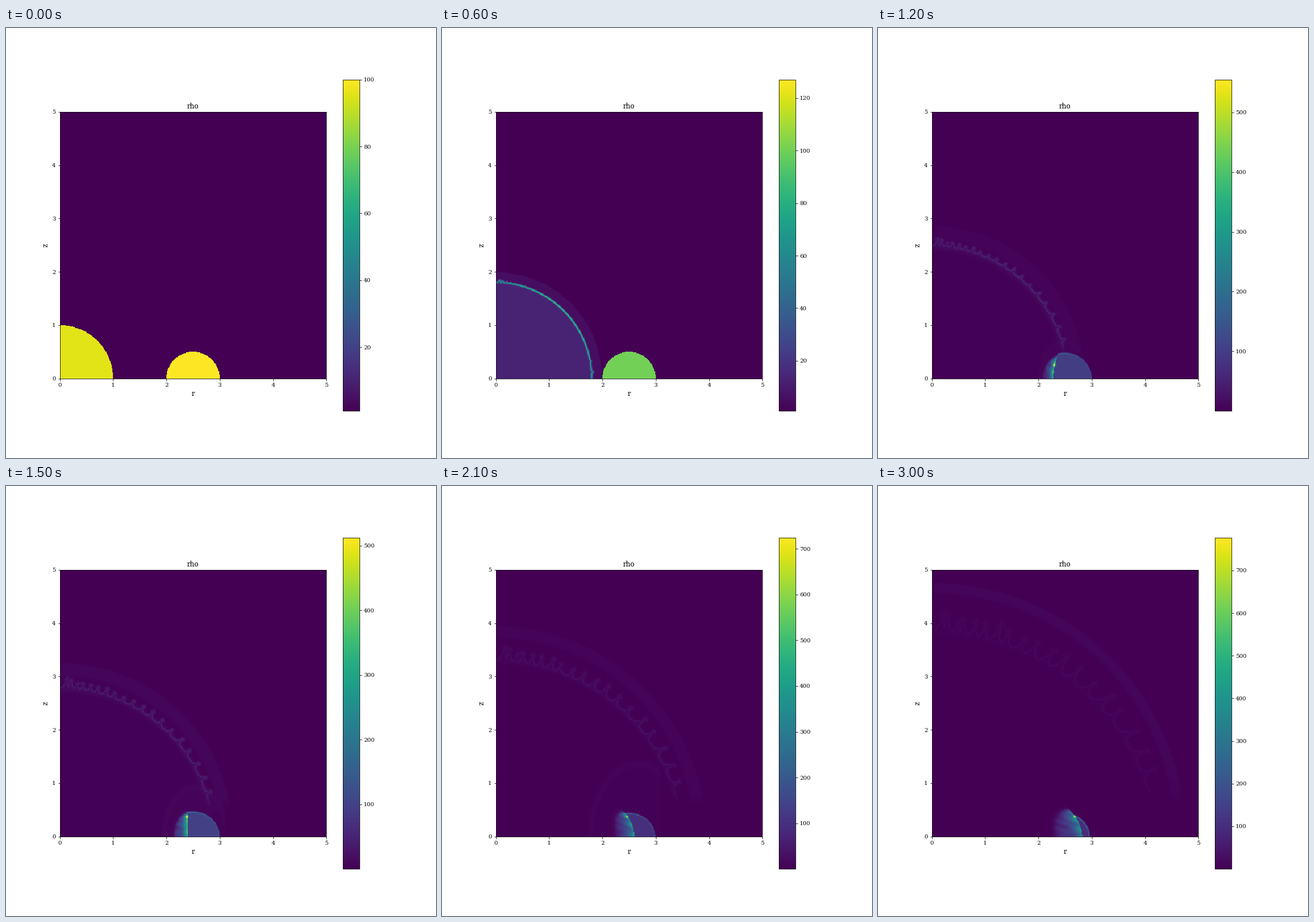
Animation of 748x748 px, one loop 3.3 s. Source, as a matplotlib script:

```python
import numpy as np
import matplotlib.pyplot as plt
from matplotlib.animation import FuncAnimation

FRAMES, INTERVAL = 11, 300
SIZE, DPI, N = 748, 72, 400
HIT = 3                       # step at which the blast reaches the cloud
PEAKS = [100, 109, 127, 669, 555, 512.5, 604.5, 724.7, 760, 802, 777]

plt.rcParams["font.family"] = "DejaVu Serif"
plt.rcParams["font.size"] = 10

# Instability fingers: closely spaced near the z axis, wider further out
rng = np.random.default_rng(4)
index = np.arange(21)
ANGLES = np.radians(2.2 + 1.9 * index + .115 * index ** 2)
LEAN = rng.uniform(-.05, .05, len(ANGLES))
SCALE = rng.uniform(.75, 1.15, len(ANGLES))

edges = np.linspace(0, 5, N + 1)
cell = (edges[1:] + edges[:-1]) / 2
r, z = np.meshgrid(cell, cell)
R = np.hypot(r, z)
theta = np.arctan2(r, z)


def gauss(x, width):
    return np.exp(-(x / width) ** 2)


def soft(x, width):
    """Smooth step from 0 to 1."""
    return 1 / (1 + np.exp(-np.clip(x / width, -50, 50)))


def near_axis(angle):
    return np.exp(-np.minimum(angle, np.pi / 2 - angle) / .16)


def fingers(k, base):
    """Shell outline pulled up into fingers, and their mushroom caps."""
    grown = .042 * max(k - 2, 0)
    at_axis = .03 * min(k, 2.5)
    height = grown + at_axis * near_axis(theta)
    line, caps = base.copy(), np.zeros_like(R)
    for angle, lean, scale in zip(ANGLES, LEAN, SCALE):
        rise = (grown + at_axis * near_axis(angle)) * scale
        across = (theta - angle - lean * (R - base)) * R
        line = np.maximum(line, base + height * scale
                          * np.exp(-np.abs(across) / (.01 + .1 * rise)))
        cap = .02 + .12 * rise
        along = R - base - rise + cap
        ring = gauss(np.hypot(across, along) - cap, .014)
        caps = np.maximum(caps, ring * (along > -.2 * cap)
                          * min(1, rise / .12))
    return line, caps


def blast(k):
    """Ejecta, shell with fingers, and the swept-up gas ahead of it."""
    radius = 1 + .43 * k - .015 * k ** 2
    shock = 1 + .525 * k - .015 * k ** 2
    base = radius * (1 + .014 * max(k - 2, 0) * (1 - np.cos(theta)))
    rho = np.where(R < base, max(95.5 / radius ** 3.4, 1), 1)
    if k == 0:
        return rho

    shadow = np.radians(76 + .25 * k if k >= HIT else 99)
    band = min(.11 * k, .27 - .008 * k)
    ahead = (R >= base) & (R < shock)
    swept = 1 + (2 + .6 * k) * soft(R - shock + band, .012)
    rho = rho + ahead * swept * soft(shadow + .04 - theta, .02)

    line, caps = fingers(k, base)
    slope_z, slope_r = np.gradient(line, cell, cell)
    slope = (slope_r * z - slope_z * r) / R
    dist = (R - line) / np.sqrt(1 + slope ** 2)
    edge = gauss(dist, .012 + .002 * min(k, 4))
    glow = .3 * gauss(R - base, .05) * np.clip(k - 2, 0, 2) / 2
    shape = np.maximum(np.maximum(edge, .75 * caps), glow)
    shape *= .72 + .28 * np.sin(2 * theta)
    return rho + 125 * np.exp(-.22 * k) * shape * soft(shadow - theta, .015)


def bow(k):
    """Faint wave reflected back from the cloud."""
    grow = .15 * (k - 1)
    level = 8 * max(np.sin(np.pi * (k - HIT) / 6.5), 0)
    q = np.hypot((r - 2.3 - .4 * grow) / grow, z / (1.55 * grow))
    return level * ((q < 1) * .5 + .6 * gauss(q - 1, .06)) * (r < 3.1)


def stripped(k, s, behind):
    """Compressed gas at the shock inside the cloud and its trailing plume."""
    reach, top = .08 + .47 * s, .35 + .14 * s ** .6
    fill = 1 - (behind / reach) ** 2 - (z / top) ** 2
    swirl = .8 + .2 * np.sin(16 * behind + 5 * np.sin(9 * z + 1) + k)
    ripple = .85 + .15 * np.sin(34 * z + k)
    body = 320 * ripple * np.exp(-behind / (.01 + .14 * s))
    body += 130 * swirl * np.exp(-behind / (1.5 * reach))
    curl = 90 * gauss(fill - .1, .12) * np.exp(-behind / .12) * (z > .2)
    return (behind >= 0) * (soft(fill - .1, .1) * body + curl)


def cloud(rho, k):
    s = max(k - 2, 0) / 8     # how far the shock has crossed the cloud
    bend = np.clip(2.5 - .5 * k, -.93, 1)

    def front(height):
        return 2 + 1.2 * s - .38 * s ** 2 + bend * height ** 2

    behind = front(z) - r
    half_r = .5 - .045 * s ** 2
    half_z = .5 - .08 * min(1.3 * s, 1)
    q = np.hypot((r - 2.5) / half_r, z / half_z)
    if k < HIT:
        return np.where(q < 1, 100, rho)

    rho = np.where((q < 1) & (behind < 0), 100, rho)
    rim = gauss((q - 1) / 2, .014) * (behind < .02)
    rho = rho + 230 * s ** .4 * rim * np.exp(np.clip(behind, -1, 0) / .4)
    rho = rho + stripped(k, s, np.clip(behind, -.01, 5))
    spot_z = .13 + .24 * min((k - HIT) / 2, 1)
    spot = np.hypot(r - front(spot_z) + .01, z - spot_z)
    return rho + 380 * gauss(spot, .025)


def density(k):
    rho = blast(k)
    if k > HIT:
        rho = rho + bow(k)
    return cloud(rho, k)


fig, ax = plt.subplots(figsize=(SIZE / DPI, SIZE / DPI), dpi=DPI)
mesh = ax.pcolormesh(edges, edges, density(0), cmap="viridis",
                     vmin=1, vmax=PEAKS[0])
bar = fig.colorbar(mesh, ax=ax)
ax.set_aspect("equal")
ax.set_title("rho", fontsize=12)
ax.set_xlabel("r", fontsize=12)
ax.set_ylabel("z", fontsize=12)
ax.set_xticks(range(6))
ax.set_yticks(range(6))


def update(k):
    mesh.set_array(density(k))
    mesh.set_clim(1 if k <= HIT else .5, PEAKS[k])
    step = 20 if k < HIT else 100
    bar.set_ticks(np.arange(step, PEAKS[k] + .01, step))
    return [mesh]


anim = FuncAnimation(fig, update, frames=FRAMES, interval=INTERVAL,
                     repeat=True, repeat_delay=0, blit=False)
plt.show()
```
